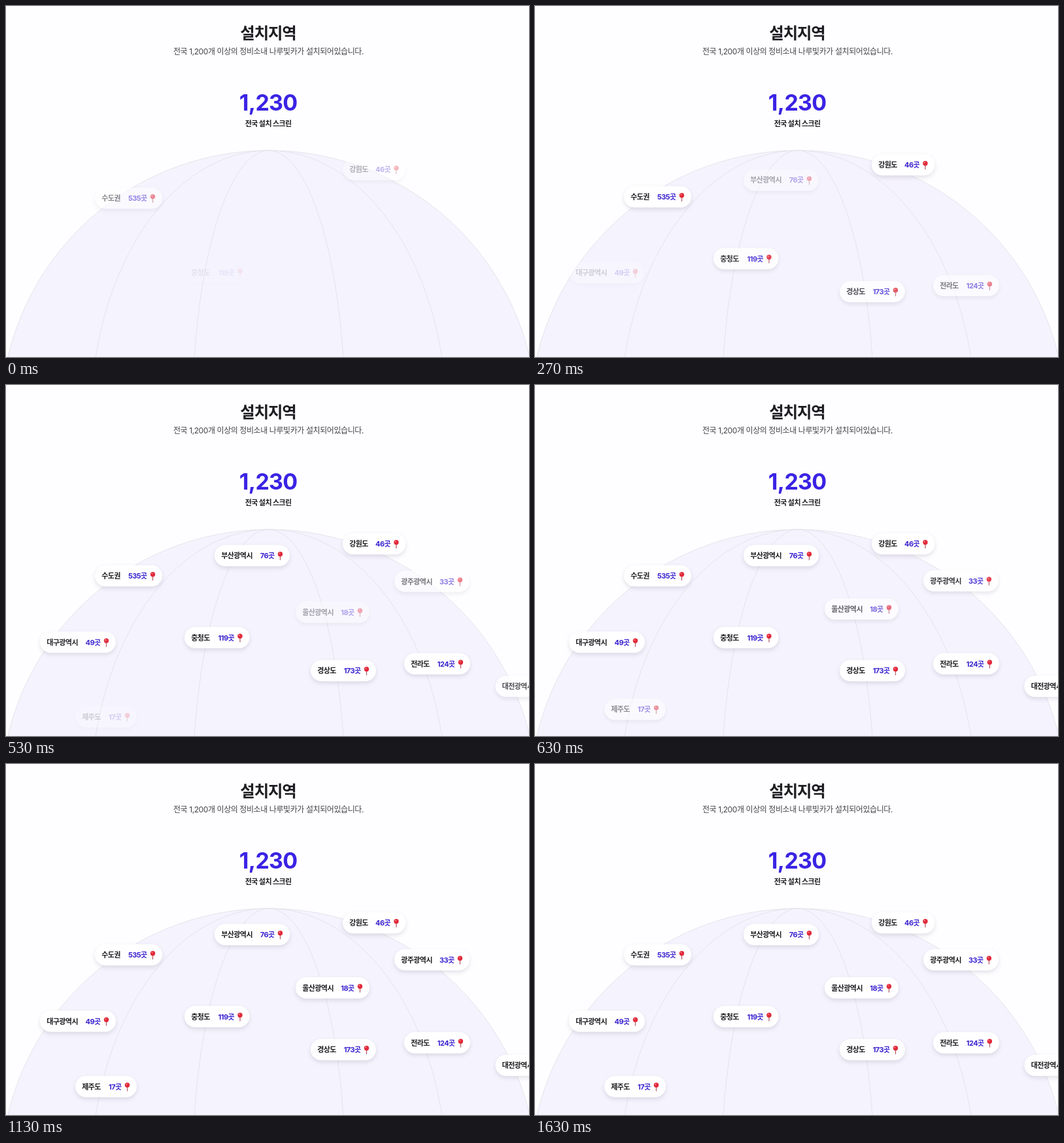
Animation, 800 px wide and 537 px high, one loop 2230 ms. Source, as an HTML page:

```html
<!DOCTYPE html>
<html lang="ko">
<head>
<meta charset="utf-8">
<title>설치지역</title>
<style>
  html, body { margin: 0; width: 100%; height: 100%; overflow: hidden; background: #fefdff; }
  svg { display: block; width: 100%; height: 100%; }
  text { font-family: Inter, "Noto Sans CJK KR", "Noto Sans CJK", sans-serif; fill: #1d1d21; }
  .head { text-anchor: middle; }
  .title { font-size: 24.4px; font-weight: 700; letter-spacing: -1.1px; }
  .sub { font-size: 12px; letter-spacing: -.41px; fill: #434347; }
  .total { font-size: 34px; font-weight: 700; letter-spacing: -.7px; fill: #3a23e4; }
  .label, .pin text { font-size: 11px; font-weight: 700; letter-spacing: -.57px; }
  .globe { fill: #f5f3fd; stroke: #e5e4eb; }
  .meridian { fill: none; stroke: #e5e4eb; }
  .pin rect { fill: #fff; filter: drop-shadow(0 3px 3px rgba(30, 25, 60, .12)); }
  .pin .count { fill: #3a23cf; text-anchor: end; }

  /* Paused animations, scrubbed through --t by the script */
  .pin {
    animation: rise 275ms ease both paused, fade 340ms linear both paused;
    animation-delay: calc((var(--start) - var(--t, 0)) * 1ms);
  }
  @keyframes rise { from { transform: translateY(23px); } to { transform: translateY(0); } }
  @keyframes fade { from { opacity: 0; } to { opacity: 1; } }
</style>
</head>
<body>
<svg id="stage" viewBox="0 0 800 537">
  <defs>
    <g id="marker">
      <path d="M0 0V6.6" stroke="#b4606c" stroke-width="1.3" stroke-linecap="round"/>
      <circle cy="-2.3" r="3.7" fill="#e12a3a"/>
      <circle cx="-1.1" cy="-3.5" r="1" fill="#f58a92"/>
    </g>
  </defs>
  <circle class="globe" cx="402" cy="631" r="410"/>
  <ellipse class="meridian" cx="402" cy="631" rx="272" ry="410"/>
  <ellipse class="meridian" cx="402" cy="631" rx="117" ry="410"/>
  <text class="head title" x="401" y="50.3">설치지역</text>
  <text class="head sub" x="401.5" y="74">전국 1,200개 이상의 정비소내 나루빛카가 설치되어있습니다.</text>
  <text class="head total" x="401.2" y="160">1,230</text>
  <text class="head label" x="401.2" y="184">전국 설치 스크린</text>
</svg>
<script>
  const LOOP = 2230;
  const stage = document.getElementById("stage");

  // name, count, left, right, middle, start in ms
  const pins = [
    ["수도권", 535, 136, 239, 292, -178],
    ["강원도", 46, 515, 611.5, 243, -110],
    ["충청도", 119, 273, 372.5, 386.5, -25],
    ["경상도", 173, 466, 566, 437, 8],
    ["전라도", 124, 609, 710, 426.5, 78],
    ["부산광역시", 76, 319, 434, 261, 143],
    ["대구광역시", 49, 52, 168, 393.5, 208],
    ["대전광역시", 40, 748.5, 864, 461, 270],
    ["광주광역시", 33, 594, 709, 299.5, 330],
    ["울산광역시", 18, 443, 556, 342.5, 400],
    ["제주도", 17, 106, 200, 493.5, 466],
  ];

  stage.insertAdjacentHTML("beforeend", pins.map(([name, count, left, right, mid, start]) => `
    <g class="pin" style="--start:${start}">
      <rect x="${left}" y="${mid - 16.25}" width="${right - left}" height="32.5" rx="16.25"/>
      <text x="${left + 10.2}" y="${mid + 4}">${name}</text>
      <text class="count" x="${right - 23.4}" y="${mid + 4}">${count}곳</text>
      <use href="#marker" x="${right - 14.5}" y="${mid}"/>
    </g>`).join(""));

  function tick() {
    stage.style.setProperty("--t", (performance.now() % LOOP).toFixed(1));
    requestAnimationFrame(tick);
  }
  tick();
</script>
</body>
</html>
```
